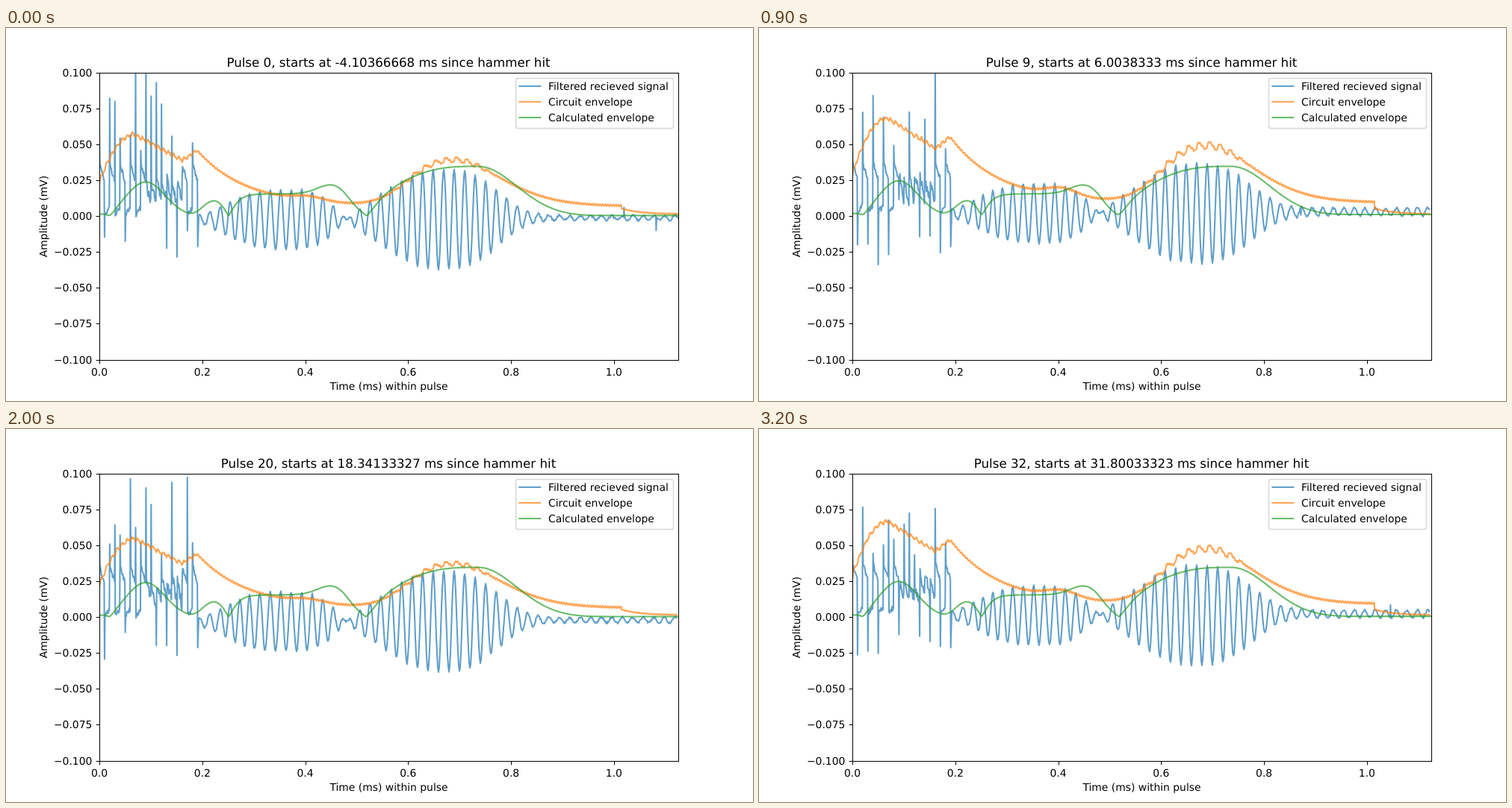
Animation, 1000 px wide and 500 px high, one loop 3.3 s. Source, as an HTML page:

```html
<!DOCTYPE html>
<html lang="en">
<head>
<meta charset="utf-8">
<title>Pulse envelopes</title>
<style>
  html, body { margin: 0; width: 100%; height: 100%; overflow: hidden; background: #fff; }
  svg { display: block; width: 100vw; height: 100vh; }
  text { font: 13.889px "DejaVu Sans", sans-serif; fill: #000; text-rendering: geometricPrecision; }
  #title { font-size: 16.667px; }
  .mid { text-anchor: middle; }
  .end { text-anchor: end; }
  .axis { fill: none; stroke: #000; }
  .line { fill: none; stroke-width: 2.083; stroke-opacity: .7; stroke-linejoin: round; stroke-linecap: square; }
  .signal { stroke: #1f77b4; }
  .circuit { stroke: #ff7f0e; }
  .calc { stroke: #2ca02c; }
</style>
</head>
<body>
<svg viewBox="0 0 1000 500">
  <clipPath id="plot"><rect x="125" y="60" width="775" height="385"/></clipPath>
  <g clip-path="url(#plot)">
    <path id="signal" class="line signal"/>
    <path id="circuit" class="line circuit"/>
    <path id="calc" class="line calc"/>
  </g>
  <path id="ticks" class="axis"/>
  <rect class="axis" x="125.5" y="60.5" width="775" height="385"/>
  <g id="labels"></g>
  <text class="mid" x="512.5" y="485">Time (ms) within pulse</text>
  <text class="mid" transform="translate(55 252.5) rotate(-90)">Amplitude (mV)</text>
  <text id="title" class="mid" x="512" y="52"></text>
  <rect x="682.5" y="67.5" width="211" height="67" rx="2.8" fill="#fff" fill-opacity=".8" stroke="#ccc" stroke-opacity=".8" stroke-width="1.39"/>
  <g id="legend"></g>
</svg>
<script>
const $ = id => document.getElementById(id);
const { exp, abs, sin, cos, tanh, hypot, floor, round, max, min, PI } = Math;
const ZERO = 252.5, LEFT = 125, FRAME = 100, COUNT = 33;
const CELL = 6.93;                  // width of one switching cell
const SWITCH_END = LEFT + 19 * CELL;
const WAVE = 14.07;                 // width of one received cycle

// Circuit gain drifts slowly from pulse to pulse: number, gain
const GAIN = [[0, 0], [4, 1], [9, 1], [14, -.4], [20, -.2], [25, .1], [32, .85]];

const clamp = v => max(0, min(1, v));
const mix = (a, b, t) => a + (b - a) * t;

function gainAt(n) {
  const i = max(0, GAIN.findIndex(g => g[0] >= n) - 1);
  const [n0, g0] = GAIN[i], [n1, g1] = GAIN[i + 1];
  return mix(g0, g1, (n - n0) / (n1 - n0));
}

// Bell with its own width and steepness on each side
function lobe(x, centre, wl, pl, wr = wl, pr = pl) {
  const d = x - centre;
  return d < 0 ? exp(-((-d / wl) ** pl)) : exp(-((d / wr) ** pr));
}

// Falls to nothing at one point
const notch = (x, at, width) => tanh(abs(x - at) / width);

// Quick rise, then a slower fall, between -1 and 1
function saw(phase, rise) {
  const u = phase - floor(phase);
  return u < rise ? -1 + 2 * u / rise : 1 - 2 * (u - rise) / (1 - rise);
}

function random(seed) {
  let a = seed * 7919 + 17;
  return () => {
    a = a + 0x6D2B79F5 | 0;
    let t = Math.imul(a ^ a >>> 15, 1 | a);
    t = t + Math.imul(t ^ t >>> 7, 61 | t) ^ t;
    return ((t ^ t >>> 14) >>> 0) / 4294967296;
  };
}

function trace(fn, end, step) {
  const pts = [];
  for (let x = LEFT; x < end + step; x += step) pts.push([x, fn(x)]);
  return toPath(pts);
}
function toPath(pts) {
  return 'M' + pts.map(p => p[0].toFixed(2) + ' ' + p[1].toFixed(2)).join('L');
}

function calcCurve(seed) {
  const rnd = random(seed + 300);
  const residue = 1 + rnd() * 3, null2 = 484 - rnd() * 4, early = 46 + rnd() * 3;
  return x => {
    const field = early * lobe(x, 187, 37, 2)
      + 30 * lobe(x, 362, 100, 9) + 10 * lobe(x, 436, 26, 2)
      + 67 * lobe(x, 632, 142, 3, 73, 2);
    const height = field * notch(x, 138, 10) * notch(x, 298, 16) * notch(x, null2, 20);
    return ZERO - hypot(height, residue);
  };
}

function circuitCurve(seed, gain) {
  const rnd = random(seed + 100);
  return x => {
    const rise = x < 172 ? 108 - 63 * ((172 - x) / 47) ** 2
      : max(108 - .53 * (x - 172), 87 - .65 * (256 - x));
    const early = x < 256 ? rise - 14 : 73 * exp((256 - x) / 65);
    const rest = x < 824 ? 14 * (1 + .35 * gain) : 3 + 7 * exp((824 - x) / 25);
    const middle = (6 + 5 * gain) * lobe(x, 405, 30, 2);
    const late = 61.5 * lobe(x, 604, 80, 2.6, 87, 1.7);
    const teeth = x < 256 ? 2.6 * saw((x - LEFT) / CELL, .3) + (rnd() - .5) * 3
      : (4 + 1.8 * gain) * saw((x - 598) / WAVE, .32) * lobe(x, 590, 70, 4, 55, 6)
        + (x < 824 ? 1.3 : .6) * sin(x * 2 * PI / 3.47);
    return ZERO - (early * (1.02 + .18 * gain) + rest + middle + late * (1 + .23 * gain) + teeth);
  };
}

// Spikes alternate up and down at the cell edges; some are much taller
function spikeAt(k, rnd) {
  const pick = rnd(), size = rnd();
  if (k && pick < .25) return 45 + size * 90;
  if (k === 12 && pick > .92) return 460;
  if (k % 2 === 0) return k > 8 && pick > .6 ? 200 : 140 + size * 30;
  return k > 7 && k < 15 && pick > .6 ? 230 : 270 + size * 50;
}

function signalPath(n, gain, end) {
  const rnd = random(n + 1), jitter = size => (rnd() - .5) * size;
  const lift = 8 * gain - 4, tail = 3 + rnd() * 2.5, pts = [];

  for (let k = 0; k < 19; k++) {
    const x0 = LEFT + k * CELL, settled = k > 8 && k < 16;
    const low = k % 2 && !settled;
    const from = low ? 248 : settled ? 192 + rnd() * 20 : 183;
    const to = low ? 240 : settled ? 222 + rnd() * 16 : 203;
    pts.push([x0, spikeAt(k, rnd)]);
    for (let t = 0; t <= 1; t += 1 / 7)
      pts.push([x0 + .5 + t * 5.9, mix(from, to, t) + jitter(settled ? 14 : 7) - lift * .4]);
  }
  pts.push([SWITCH_END, 293]);

  const glitches = [0, 1].map(() => round(700 + rnd() * 190));
  for (let x = 258; x <= end; x++) {
    const swing = 67 * lobe(x, 588, 101, 2.6, 82, 2.8) - 40 * lobe(x, 372, 90, 3, 76, 4)
      + tail * clamp((x - 620) / 60);
    const shift = 3.5 * clamp((330 - x) / 40);
    const centre = ZERO - lift - 2 * clamp((x - 620) / 100);
    pts.push([x, centre - swing * cos((x - 600 - shift) * 2 * PI / WAVE) + jitter(3)]);
    if (glitches.includes(x)) pts.push([x + .3, centre + jitter(50)]);
  }
  return toPath(pts);
}

// Start times lie on a 0.5 microsecond grid, with a slow clock drift
function startText(n) {
  const offset = n < 4 ? n * 1.125 : 4.5 + (n - 4) * 1.1215 + round((n - 4) / 16) * .001;
  return String(+(offset - 4.10366668 - round(n * .27) * 1e-8).toFixed(8));
}

function draw(n) {
  const gain = gainAt(n), end = n < 4 ? 900 : 897.6;
  $('title').textContent = `Pulse ${n}, starts at ${startText(n)} ms since hammer hit`;
  $('signal').setAttribute('d', signalPath(n, gain, end));
  $('circuit').setAttribute('d', trace(circuitCurve(n, gain), end, .7));
  $('calc').setAttribute('d', trace(calcCurve(n), end, 1.5));
}

function drawAxes() {
  let ticks = '', labels = '';
  for (let i = 0; i < 6; i++) {
    const x = LEFT + i * 137.78;
    ticks += `M${round(x) + .5} 445.5v4.86`;
    labels += `<text class="mid" x="${x}" y="466">${(i * .2).toFixed(1)}</text>`;
  }
  for (let i = -4; i < 5; i++) {
    const y = floor(ZERO - i * 48.125), sign = i < 0 ? '\u2212' : '';
    ticks += `M125.5 ${y + .5}h-4.86`;
    labels += `<text class="end" x="115.3" y="${y + 5}">${sign}${abs(i * .025).toFixed(3)}</text>`;
  }
  $('ticks').setAttribute('d', ticks);
  $('labels').innerHTML = labels;
  const names = { signal: 'Filtered recieved signal', circuit: 'Circuit envelope', calc: 'Calculated envelope' };
  $('legend').innerHTML = Object.entries(names).map(([name, text], i) =>
    `<path class="line ${name}" d="M687.4 ${78 + i * 21}h27.8"/><text x="726" y="${83 + i * 21}">${text}</text>`).join('');
}

let shown = -1;
const begin = performance.now();
function tick() {
  const n = floor((performance.now() - begin) / FRAME) % COUNT;
  if (n !== shown) draw(shown = n);
  requestAnimationFrame(tick);
}
drawAxes();
tick();
</script>
</body>
</html>
```
